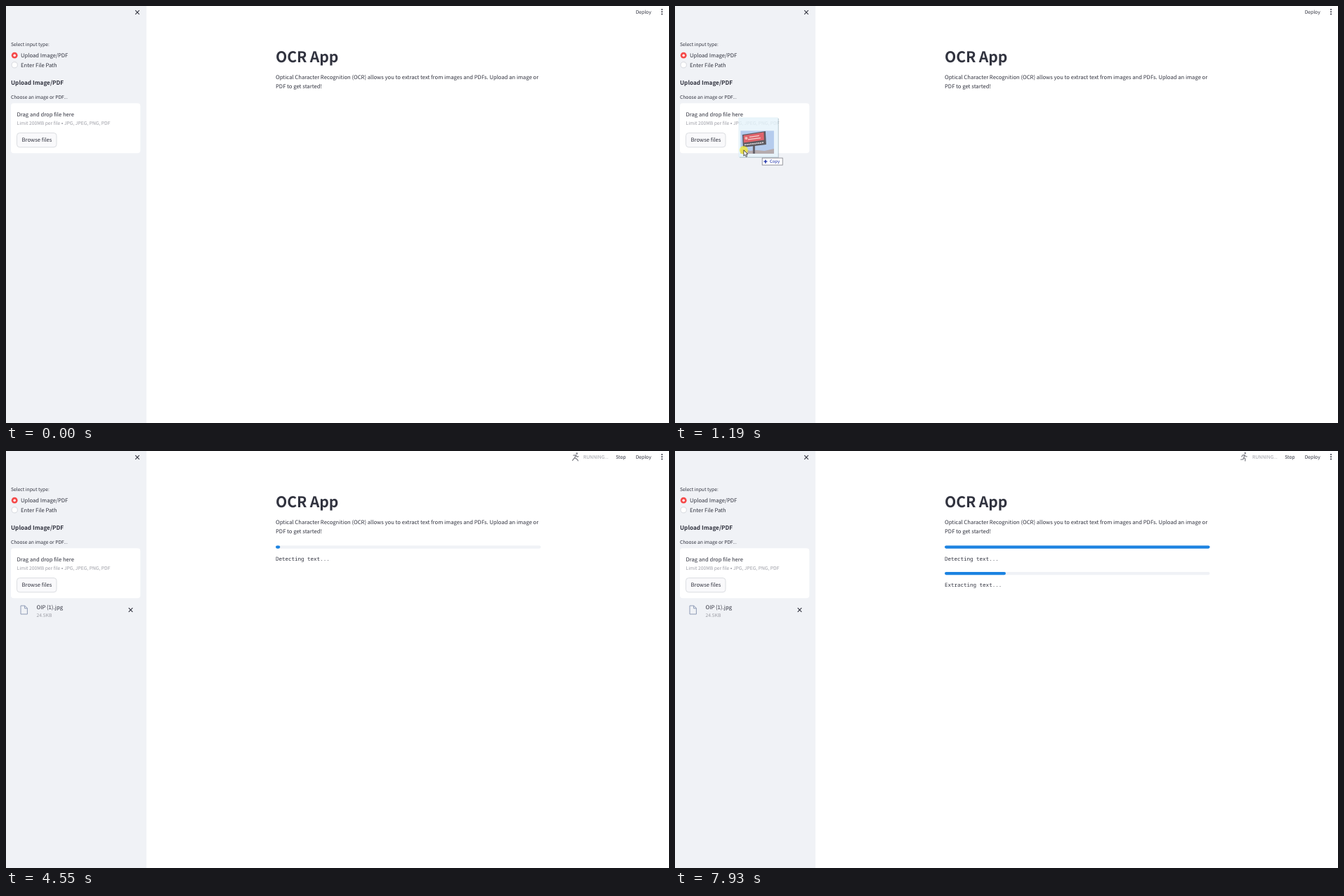
Write an HTML page that moves like this. It is 944 px wide and 593 px high and loops after 7990 ms.

```html
<!DOCTYPE html>
<html lang="en">
<head>
<meta charset="utf-8">
<title>OCR App</title>
<style>
  html, body { margin: 0; width: 100%; height: 100%; overflow: hidden; background: #fff; }
  svg { display: block; width: 944px; height: 593px; }
  text {
    font: 7.68px "Noto Sans CJK JP", "Noto Sans CJK SC", "Noto Sans CJK", "Noto Sans", sans-serif;
    fill: #31333f; text-rendering: geometricPrecision; white-space: pre;
  }
  text.small { font-size: 6.72px; }
  text.head { font-size: 8.2px; font-weight: 600; }
  text.title { font-size: 21.1px; font-weight: 700; }
  text.mono { font: 7.52px "Noto Sans Mono", "Liberation Mono", monospace; }
  text.faint { fill: #9d9ea6; }
  text.copy { font-size: 6px; fill: #1b2fa8; }
  .cross { stroke: #31333f; stroke-width: 1.1; fill: none; }
  .figure { stroke: #85868e; stroke-width: 1.35; fill: none; stroke-linecap: round; stroke-linejoin: round; }
  .figure circle { fill: #85868e; stroke: none; }
  .pointer { fill: #fff; stroke: #222; stroke-width: .8; stroke-linejoin: round; }
  .track { fill: #f0f2f6; }
  .fill { fill: #1c83e1; }
</style>
</head>
<body>
<svg viewBox="0 0 944 593">
  <rect width="944" height="593" fill="#fff"/>
  <rect width="200" height="593" fill="#f0f2f6"/>

  <!-- sidebar -->
  <path class="cross" d="M184.2 6.2l5.6 5.6m0-5.6l-5.6 5.6"/>
  <text class="small" x="7" y="57">Select input type:</text>
  <circle cx="12.2" cy="70.2" r="4.4" fill="#f54a4a"/>
  <circle cx="12.2" cy="70.2" r="1.7" fill="#fff"/>
  <text x="21" y="73">Upload Image/PDF</text>
  <circle cx="12.2" cy="83.8" r="4.1" fill="#fff" stroke="#cfd1d7" stroke-width=".8"/>
  <text x="21" y="87">Enter File Path</text>
  <text class="head" x="7" y="112">Upload Image/PDF</text>
  <text class="small" x="7" y="132.3">Choose an image or PDF...</text>
  <rect x="7" y="138.3" width="184.3" height="71" rx="4" fill="#fff"/>
  <text x="15.5" y="156.6">Drag and drop file here</text>
  <text class="small faint" x="15.5" y="169.4">Limit 200MB per file</text>
  <circle cx="80" cy="167" r="1" fill="#9d9ea6"/>
  <text class="small faint" x="83" y="169.4">JPG, JPEG, PNG, PDF</text>
  <rect x="15.5" y="180.5" width="56.5" height="20.3" rx="4" fill="#f9f9fb" stroke="#d4d6db" stroke-width=".8"/>
  <text x="22.5" y="193.4">Browse files</text>

  <g id="file">
    <path d="M21 220h5.8l3.6 3.6v8.4H21zM26.6 220v3.8h3.8" fill="none" stroke="#8e9bb5"/>
    <text x="43.5" y="224.6">OIP (1).jpg</text>
    <text class="small faint" x="43.5" y="236">24.5KB</text>
    <path class="cross" d="M174.7 223.2l5.6 5.6m0-5.6l-5.6 5.6"/>
  </g>

  <!-- toolbar -->
  <g id="running">
    <g class="figure">
      <circle cx="810.7" cy="3.2" r="1.4"/>
      <path d="M806.2 6h9M810.7 6v4M809.6 6.5v7.2M811.8 6.5v7.2"/>
    </g>
    <g class="figure">
      <circle cx="812.8" cy="3.6" r="1.4"/>
      <path d="M808 6.2l3.6-.2 1.6 2.4 1.8-.6M811.6 6.2l-2 3.6 3.2 1.6 1.8 2.4M809.6 9.8l-3 3.6"/>
    </g>
    <g class="figure">
      <circle cx="811.8" cy="3.1" r="1.4"/>
      <path d="M806.9 8l1.4-2.2 2.6-.2 1.6 2 1.8.2M810.9 5.8l-1 3.8 2 1.4v3M809.9 9.6l-1.1 2.3-2.9.3"/>
    </g>
    <text class="small faint" x="822" y="10.8">RUNNING...</text>
    <text class="small" x="868.3" y="10.8">Stop</text>
  </g>
  <text class="small" x="896.7" y="10.8">Deploy</text>
  <g fill="#31333f">
    <circle cx="934" cy="5" r="1"/><circle cx="934" cy="8.2" r="1"/><circle cx="934" cy="11.4" r="1"/>
  </g>

  <!-- main column -->
  <text class="title" x="384" y="80" letter-spacing="-.1">OCR App</text>
  <text x="384" y="103.8">Optical Character Recognition (OCR) allows you to extract text from images and PDFs. Upload an image or</text>
  <text x="384" y="117.3">PDF to get started!</text>
  <g id="detect">
    <rect class="track" x="384" y="134.4" width="377.5" height="4.3" rx="2.1"/>
    <rect class="fill" x="384" y="134.4" height="4.3" rx="2.1"/>
    <text class="mono" x="384" y="156">Detecting text...</text>
  </g>
  <g id="extract">
    <rect class="track" x="384" y="171.9" width="377.5" height="4.3" rx="2.1"/>
    <rect class="fill" x="384" y="171.9" height="4.3" rx="2.1"/>
    <text class="mono" x="384" y="193.4">Extracting text...</text>
  </g>

  <!-- dragged picture -->
  <g id="drag">
    <g opacity=".82">
      <rect x="1" y="1" width="56" height="56" fill="#7f95a3" opacity=".55"/>
      <rect width="55.5" height="55.5" fill="#e6f4fb" stroke="#d3e8f2" stroke-width=".6"/>
      <rect x="2.5" y="18.5" width="47.5" height="32.5" fill="#a5c1ea"/>
      <path d="M2.5 46l6-2 7 3 10-1 11 1 13.500-3v7H2.500z" fill="#a59a9d"/>
      <path d="M20 38h3v13h-3z" fill="#45404a"/>
      <path d="M5 24l33-5 1 19-33 4z" fill="#3a363f"/>
      <path d="M6.500 25l29-4.500.5 11-29 4z" fill="#d9434c"/>
      <path d="M15 27.500l14-2M13 31l18-2.400" stroke="#f3c9c6" stroke-width="1.300"/>
      <path d="M8 38.500l27-3.200" stroke="#d9d5da" stroke-width="1.800" stroke-dasharray="2 .8"/>
      <circle cx="10.500" cy="29" r="2" fill="#efb0a8"/>
    </g>
    <rect x="33.300" y="57.200" width="29" height="10" fill="#fff" stroke="#7d7d85" stroke-width=".8"/>
    <path d="M35.500 62.200h5m-2.500-2.500v5" stroke="#1b2fa8" stroke-width="1.400"/>
    <text class="copy" x="44" y="64.500">Copy</text>
    <g id="arrow">
      <circle r="6" fill="#f5ee35" opacity=".75"/>
      <path class="pointer" d="M0 0v8.200l1.900-1.700 1.400 3 1.500-.7-1.400-2.900h2.500z"/>
    </g>
  </g>
  <path id="hand" class="pointer" d="M-1.800-5.200q.9-1.200 1.800 0v4l4 .8q1 .3.900 1.500l-.7 3.700-.8 1.700h-4.600l-3.200-4.600q0-1.200 1.200-.9l1.400 1.200zM0-1v2m1.500-1.600v1.800m1.500-1.500v1.700"/>
</svg>
<script>
  const LOOP = 7990;
  const $ = id => document.getElementById(id);

  // Each track is a list of [time, ...values], read linearly.
  const dragPath = [[130, 859, 405], [200, 800, 396], [270, 742, 384], [330, 665, 352], [400, 542, 313],
    [465, 440, 275], [530, 385, 248], [660, 311, 222], [860, 249, 210], [930, 204, 198],
    [1190, 91, 159], [1650, 41, 127]];
  const arrowOffset = [[400, .5, 40], [1190, 7, 46]];
  const handPath = [[2550, 48, 173], [2870, 60, 176], [3140, 89, 182], [3300, 89, 240], [3610, 82, 605]];
  const detectWidth = [[4500, 0], [4550, 6], [4850, 73], [5675, 254], [6350, 321], [6720, 321], [7000, 377.5]];
  const extractWidth = [[7080, 0], [7250, 17], [7930, 87]];

  function at(track, t) {
    if (t <= track[0][0]) return track[0].slice(1);
    const i = track.findIndex(key => key[0] > t);
    if (i < 0) return track[track.length - 1].slice(1);
    const [t0, ...a] = track[i - 1], [t1, ...b] = track[i];
    return a.map((v, n) => v + (b[n] - v) * (t - t0) / (t1 - t0));
  }

  const show = (el, on) => el.style.display = on ? '' : 'none';
  const move = (el, [x, y]) => el.setAttribute('transform', `translate(${x} ${y})`);
  const fillTo = (id, track, t) => $(id).querySelector('.fill').setAttribute('width', at(track, t)[0]);
  const figures = document.querySelectorAll('.figure');

  function draw() {
    const t = performance.now() % LOOP;

    show($('drag'), t >= 130 && t < 2550);
    move($('drag'), at(dragPath, t));
    move($('arrow'), at(arrowOffset, t));
    $('drag').style.opacity = at([[2260, 1], [2550, 0]], t)[0];

    show($('hand'), t >= 2260 && t < 3610);
    move($('hand'), at(handPath, t));

    show($('file'), t >= 2870);
    show($('running'), t >= 2940);
    const pose = Math.floor(((t + 605 - 3120 % 605) % 605) / 202) % 3;
    figures.forEach((figure, i) => show(figure, i === pose));

    show($('detect'), t >= 4400);
    fillTo('detect', detectWidth, t);
    show($('extract'), t >= 7050);
    fillTo('extract', extractWidth, t);

    requestAnimationFrame(draw);
  }
  draw();
</script>
</body>
</html>
```
